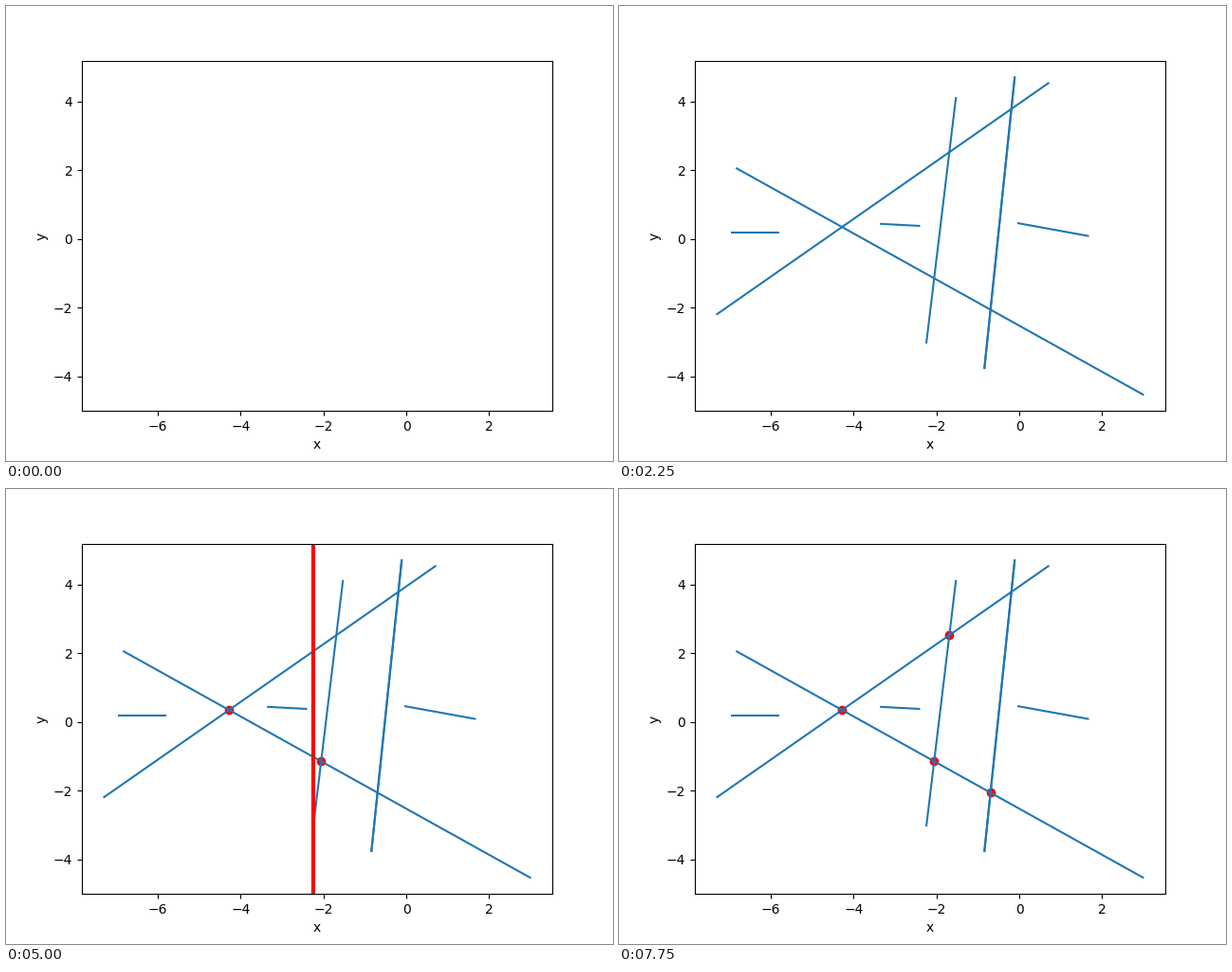
A matplotlib script that plays this animation: 640x480 px, repeating every 8 s.

```python
import numpy as np
import matplotlib.pyplot as plt
from matplotlib.animation import FuncAnimation
from matplotlib.collections import LineCollection

N_FRAMES, INTERVAL = 32, 250

RISING = ((-7.32, -2.20), (0.72, 4.554))
FALLING = ((-6.845, 2.07), (3.008, -4.538))
LEFT = ((-6.962, 0.19), (-5.805, 0.19))
MIDDLE = ((-3.366, 0.444), (-2.396, 0.383))
STEEP = ((-2.247, -3.04), (-1.53, 4.135))
STEEPER = ((-0.845, -3.78), (-0.11, 4.731))
RIGHT = ((-0.048, 0.466), (1.682, 0.088))
# The steeper segment is laid down twice, which makes it look bolder.
SEGMENTS = [RISING, FALLING, LEFT, MIDDLE, STEEP, STEEPER, STEEPER, RIGHT]


def cross(s, t):
    """Point where the segments s and t meet."""
    (p, p2), (q, q2) = np.array(s), np.array(t)
    a, _ = np.linalg.solve(np.column_stack((p2 - p, q - q2)), q - p)
    return tuple(p + a * (p2 - p))


START = cross(RISING, FALLING)
LOWER = cross(FALLING, STEEP)
UPPER = cross(RISING, STEEP)
LAST = cross(FALLING, STEEPER)

# Sweep stops in order: x of the event and the crossing detected there.
EVENTS = [
    (RISING[0][0], None),
    (LEFT[0][0], None),
    (FALLING[0][0], None),
    (LEFT[1][0], START),
    (START[0], None),
    (MIDDLE[0][0], None),
    (MIDDLE[1][0], None),
    (STEEP[0][0], LOWER),
    (LOWER[0], UPPER),
    (UPPER[0], None),
    (STEEP[1][0], None),
    (STEEPER[0][0], LAST),
]


def build_states():
    """One (segments shown, sweep x, crossings) per frame."""
    first = EVENTS[0][0]
    found = []
    states = [(False, None, []), (True, None, []),
              (True, first, []), (True, None, [])]
    for x, point in EVENTS:
        states.append((True, x, found))
        if point is not None:
            found = found + [point]
            states.append((True, x, found))
        states.append((True, None, found))
    return states[:N_FRAMES]


STATES = build_states()

fig, ax = plt.subplots(figsize=(6.4, 4.8), dpi=100)
ax.set_xlim(-7.837, 3.526)
ax.set_ylim(-5.0014, 5.194)
ax.set_xlabel("x")
ax.set_ylabel("y")

segments = ax.add_collection(LineCollection(SEGMENTS, color="C0", lw=1.5),
                             autolim=False)
dots = ax.scatter([], [], color="red", zorder=1)
sweep = ax.axvline(0, color="red", lw=3)


def update(frame):
    shown, x, found = STATES[frame]
    segments.set_visible(shown)
    sweep.set_visible(x is not None)
    if x is not None:
        sweep.set_xdata([x, x])
    dots.set_offsets(np.array(found).reshape(-1, 2))
    return segments, dots, sweep


anim = FuncAnimation(fig, update, frames=N_FRAMES, interval=INTERVAL,
                     repeat=True, repeat_delay=0)
plt.show()
```
